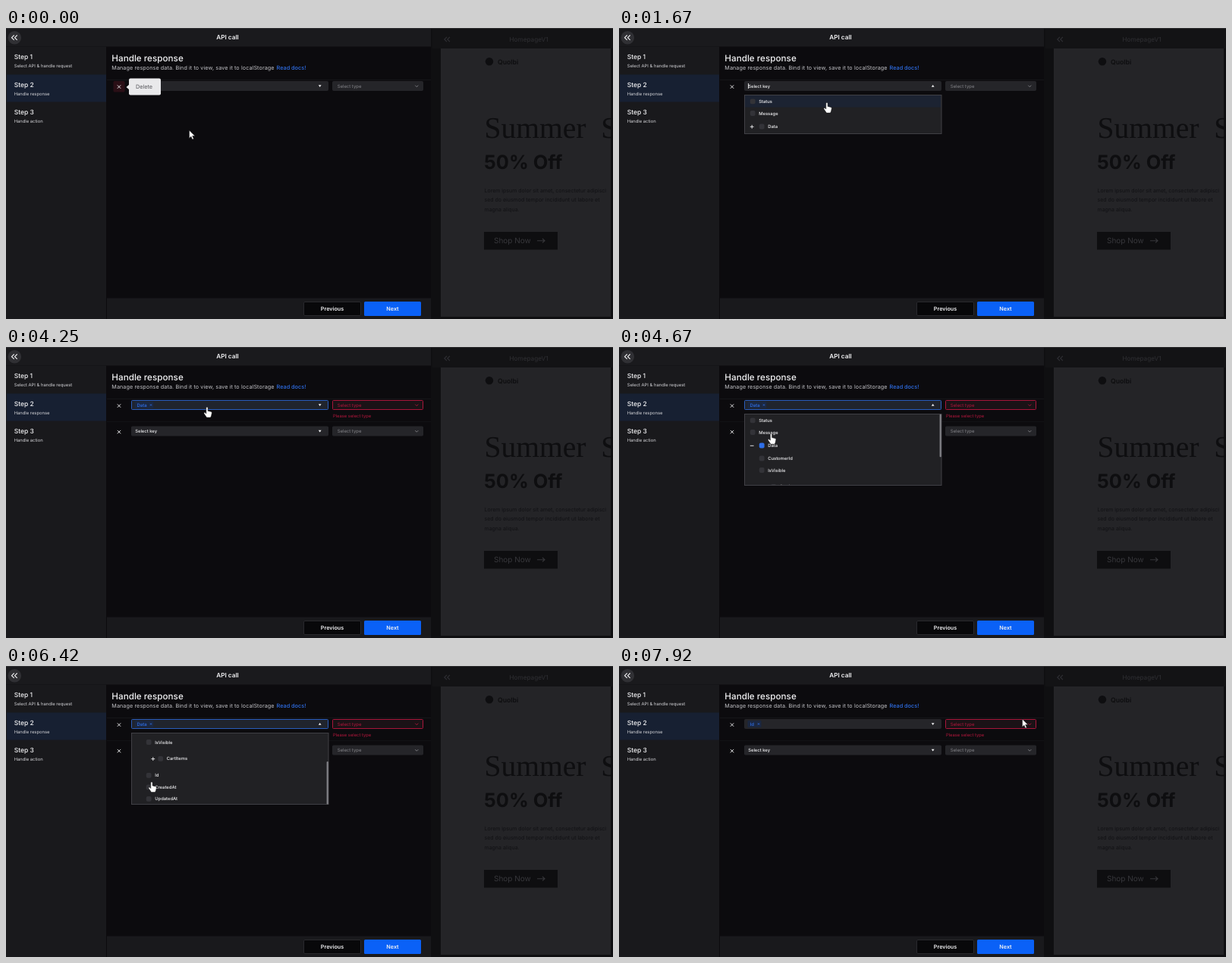
Write an HTML page that moves like this. It is 800 by 384 pixels and loops after 8000 ms.

```html
<!DOCTYPE html>
<html lang="en">
<head>
<meta charset="utf-8">
<title>API call – handle response</title>
<style>
  html, body { margin: 0; width: 100%; height: 100%; overflow: hidden; background: #0c0b0e; }
  svg { display: block; width: 100vw; height: 100vh; }
  text { font-family: Inter, "Open Sans", sans-serif; text-rendering: geometricPrecision; white-space: pre; }
  .serif { font-family: "Liberation Serif", "Noto Serif", serif; word-spacing: 10px; }
</style>
</head>
<body>
<svg viewBox="0 0 800 384" xmlns="http://www.w3.org/2000/svg">
  <defs>
    <clipPath id="list"><rect x="166" y="89" width="258" height="93"/></clipPath>
  </defs>
  <g id="base"></g>
  <g id="live"></g>
</svg>
<script>
const LOOP = 8000, FPS = 12;
const WHITE = '#f2f2f4', BLUE = '#2f6fe8', RED = '#b5173d', FIELD = '#252529';

const rect = (x, y, w, h, fill, more = '') =>
  `<rect x="${x}" y="${y}" width="${w}" height="${h}" fill="${fill}" ${more}/>`;
const text = (x, y, s, size, fill = WHITE, weight = 400, more = '') =>
  `<text x="${x}" y="${y}" font-size="${size}" fill="${fill}" font-weight="${weight}" ${more}>${s}</text>`;
const line = (d, stroke, width = 1, more = '') =>
  `<path d="${d}" fill="none" stroke="${stroke}" stroke-width="${width}" ${more}/>`;
const shape = (d, fill, more = '') => `<path d="${d}" fill="${fill}" ${more}/>`;
const mid = 'text-anchor="middle"';

const chevrons = (x, y, color) =>
  line(`M${x} ${y - 3.2}l-3.2 3.2 3.2 3.2m4-6.4l-3.2 3.2 3.2 3.2`, color, 1.1);
const cross = (x, y, r, color, width) =>
  line(`M${x - r} ${y - r}l${2 * r} ${2 * r}m0 ${-2 * r}l${-2 * r} ${2 * r}`, color, width);

function step(n, title, note) {
  const y = 25 + (n - 1) * 36.5;
  return (n === 2 ? rect(1, y, 131, 36, '#172032') : '') +
    text(10.7, y + 16, title, 8.5, WHITE, 500) +
    text(10.7, y + 27, note, 5.85, '#d4d4d8');
}

function preview() {
  const ink = '#0e0e10', faint = '#111114';
  const copy = ['Lorem ipsum dolor sit amet, consectetur adipisci',
    'sed do eiusmod tempor incididunt ut labore et', 'magna aliqua.'];
  return rect(560, 0, 240, 384, '#0f0f11') +
    rect(561.5, 1, 238.5, 26, '#131315') +
    chevrons(581, 15, '#303034') +
    text(689, 18, 'HomepageV1', 8.2, '#303034', 400, mid) +
    rect(573, 27, 224, 354, '#242427') +
    `<circle cx="637" cy="44.3" r="5.2" fill="${ink}"/>` +
    text(648, 47.6, 'Quolbi', 8.7, ink, 600) +
    text(630.5, 145, 'Summer S', 39.5, ink, 400, 'class="serif"') +
    text(630, 185.5, '50% Off', 25.4, ink, 700) +
    copy.map((s, i) => text(630.5, 216.5 + i * 12.8, s, 7, faint)).join('') +
    rect(630, 269, 97, 23.5, ink) +
    text(643, 284.2, 'Shop Now', 10, '#37373b') +
    line('M700 280.7h10m-3-2.7l3 2.7-3 2.7', '#37373b', 1.1);
}

function base() {
  return rect(0, 0, 800, 384, '#0c0b0e') +
    rect(0, 0, 560, 24.5, '#1a1a1d') +
    rect(0, 24.5, 132, 360, '#19191c') +
    '<circle cx="11.3" cy="12.7" r="8.8" fill="#303034"/>' + chevrons(10.7, 12.7, WHITE) +
    text(292, 15, 'API call', 8.2, WHITE, 600, mid) +
    step(1, 'Step 1', 'Select API &amp; handle request') +
    step(2, 'Step 2', 'Handle response') +
    step(3, 'Step 3', 'Handle action') +
    text(139.3, 44.3, 'Handle response', 11.7, WHITE, 500) +
    text(139.3, 55.4, 'Manage response data. Bind it to view, save it to localStorage',
      7.2, '#c4c4c8', 400, 'letter-spacing=".1"') +
    text(356.5, 55.4, 'Read docs!', 7.3, BLUE, 500) +
    rect(133, 68, 427, 1, '#161619') +
    rect(133, 356.5, 427, 27.5, '#19191c') +
    rect(392.5, 361.5, 75, 18, '#08080a', 'rx="1.5" stroke="#29292d"') +
    text(430, 373, 'Previous', 7.2, WHITE, 600, mid) +
    rect(472, 361, 75, 19, '#0a61f7', 'rx="1.5"') +
    text(509.5, 373, 'Next', 7.2, WHITE, 600, mid) +
    preview() +
    rect(0, 0, 800, .8, '#38383a');
}

function row(y, { chip, error, focus, open }) {
  const tone = error ? RED : '#85858a';
  const edge = color => `rx="1" stroke="${color}"`;
  const chipW = chip === 'Id' ? 18 : 25;
  const caret = open ? `M411.8 ${y + 1.3}h3.8l-1.9-2.9z` : `M411.8 ${y - 1.3}h3.8l-1.9 2.9z`;
  return cross(149, y + 1.1, 2.2, WHITE, .9) +
    rect(165.5, y - 6, 259, 12, focus ? '#20242d' : FIELD, edge(focus ? '#2a5dbc' : FIELD)) +
    (chip
      ? rect(169.5, y - 4.5, chipW, 9, '#1b2740', 'rx="1"') +
        text(172.5, y + 2.1, chip, 6, BLUE, 500) + cross(166 + chipW, y, 1.1, BLUE, .8)
      : text(170.2, y + 2.1, 'Select key', 5.85, WHITE, 500)) +
    shape(caret, WHITE) +
    rect(430.5, y - 6, 119, 12, error ? '#1b1216' : FIELD, edge(error ? '#a8163a' : FIELD)) +
    text(436.7, y + 2, 'Select type', 5.95, tone) +
    line(`M539.3 ${y - .8}l2 2 2-2`, tone, .9) +
    (error ? text(431, y + 16.2, 'Please select type', 5.8, RED) : '');
}

// label, y, indent, distance of the toggle sign
const ITEMS = [['Status', 96.8, 0], ['Message', 112.5, 0], ['Data', 130, 12, 13],
  ['CustomerId', 147, 12], ['IsVisible', 162.5, 12], ['CartItems', 184.3, 27.5, 9.9],
  ['Id', 206.3, 12], ['CreatedAt', 221.8, 12], ['UpdatedAt', 237.3, 12]];

function dropdown(expanded, scroll, checked) {
  const h = expanded ? 94 : 51;
  const items = ITEMS.slice(0, expanded ? 9 : 3).map(([label, y, dx, sign]) => {
    const x = 176.2 + dx, minus = expanded && label === 'Data';
    return rect(x - 3.4, y - 3.4, 6.8, 6.8, label === checked ? BLUE : '#333338', 'rx="2"') +
      text(x + 8, y + 2.1, label, 5.85, WHITE, 500) +
      (sign ? line(`M${x - sign - 2.4} ${y + .3}h4.8` + (minus ? '' : 'm-2.4 -2.4v4.8'), WHITE, .9) : '');
  }).join('');
  return rect(165.5, 88.5, 259.5, h, '#212124', 'stroke="#404045"') +
    `<g clip-path="url(#list)"><g transform="translate(0 ${-scroll})">` +
    (expanded ? '' : rect(166, 89, 259, 15.5, '#1c2332')) + items + '</g></g>' +
    (expanded ? rect(422.6, 88.8 + scroll * .6, 2.2, 56.5, '#828287', 'rx="1"') : '');
}

function tooltip() {
  return rect(141.5, 70, 15, 14.5, '#2a0f16', 'rx="1.5"') + cross(149, 77.6, 2.2, WHITE, .9) +
    shape('M158.5 78l4-3.5v7z', '#e9e9eb') +
    rect(162, 66.5, 42, 22, '#e9e9eb', 'rx="2"') +
    text(171, 80.2, 'Delete', 7.3, '#55555a');
}

const ARROW = 'M0 0v10.4l2.4-2.2 1.7 3.9 1.8-.8-1.7-3.8h3.3z';
const HAND = 'M-1.2 .9c0-1.3 2.3-1.3 2.3 0v4l3.9 1c1 .3 1.5 1 1.3 2l-.8 3.7-1 2h-5' +
  'l-3.4-5.1c-.7-1.1.6-2.1 1.5-1.2l1.2 1.2z';

const POINTER = [[0, 241.5, 135], [250, 335, 95], [417, 293, 76], [1250, 293, 76],
  [1660, 274, 98.5], [1833, 274, 98.5], [2083, 190, 122], [2250, 190, 122],
  [2500, 191.5, 131], [3083, 191.5, 131], [3917, 265, 79.4], [4500, 265, 79.4],
  [4750, 178, 127], [5083, 229, 159], [5170, 229, 159], [5333, 225, 151.3],
  [5667, 225, 151.3], [6410, 192, 153], [6500, 192, 153], [6833, 187, 140],
  [7583, 187, 140], [7910, 531.5, 70], [LOOP, 531.5, 70]];
const SCROLL = [[0, 0], [5167, 0], [5333, 49], [5500, 62], [LOOP, 62]];

function track(keys, t, ease) {
  const i = Math.max(1, keys.findIndex(k => k[0] > t));
  const a = keys[i - 1], b = keys[i];
  const u = ease((t - a[0]) / (b[0] - a[0]));
  return a.slice(1).map((v, n) => v + (b[n + 1] - v) * u);
}

function pointer(t) {
  const [x, y] = track(POINTER, t, u => u * u * (3 - 2 * u));
  const arrow = t < 330 || (t > 3150 && t < 3740) || t > 7650;
  return shape(arrow ? ARROW : HAND, '#fff',
    `stroke="#111" stroke-width=".5" transform="translate(${x} ${y})"`);
}

function live(t) {
  const within = (a, b) => t >= a && t < b;
  const picked = t >= 2500, first = within(910, 2500), second = within(4330, 7080);
  const chip = t >= 7080 ? 'Id' : picked ? 'Data' : '';
  const caret = within(910, 1160) || within(1660, 2080);
  return row(76.5, { chip, error: picked, focus: within(4160, 7080), open: first || second }) +
    (picked ? rect(133, 98, 427, 1, '#121215') + row(111, {}) : '') +
    (caret ? rect(170, 73, .8, 7, '#fff') : '') +
    (t < 745 ? tooltip() : '') +
    (first ? dropdown(false, 0, t > 2400 && 'Data') : '') +
    (second ? dropdown(true, track(SCROLL, t, u => u)[0], t > 6990 ? 'Id' : 'Data') : '') +
    pointer(t);
}

const layer = document.getElementById('live');
const start = performance.now();
let shown = -1;

function frame() {
  const t = (performance.now() - start) % LOOP;
  const tick = Math.floor((t + 4) * FPS / 1000) % (LOOP * FPS / 1000);
  if (tick !== shown) {
    shown = tick;
    layer.innerHTML = live(tick * 1000 / FPS);
  }
  requestAnimationFrame(frame);
}

document.getElementById('base').innerHTML = base();
frame();
</script>
</body>
</html>
```
